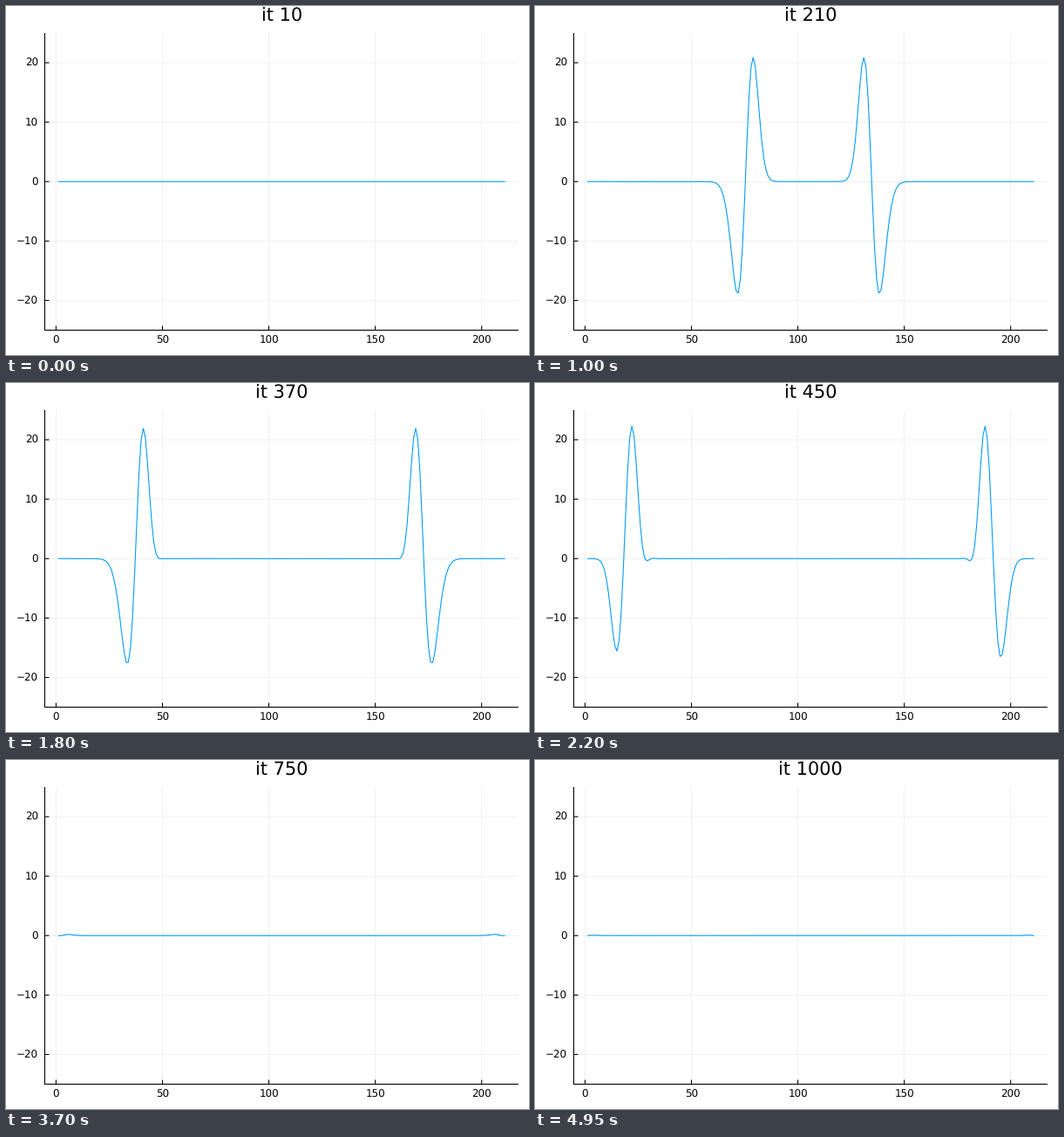
Recreate the animation shown at these times as a matplotlib script. Size 600x400 px, loop 5000 ms.

```python
import numpy as np
import matplotlib.pyplot as plt
from matplotlib.animation import FuncAnimation

plt.rcParams["text.hinting"] = "none"

W, H, DPI = 600, 400, 100
PT = 72 / DPI                     # points per pixel
FRAMES, STEPS = 100, 10           # pictures, time steps per picture

# Wave model: units of one cell and one time step
NX, SRC = 211, 104
COURANT = 0.24
SIGMA, DELAY, GAIN = 15.4, 85.2, 1.01
HALO, REFLECT = 20, 1e-5


def px(x):
    return 57.4 + 2.4415 * x


def py(y):
    return 201.25 - 6.812 * y


# Plot area in pixels
LEFT, RIGHT, TOP, BOTTOM = px(-5.3), px(217.3), py(25), py(-25)


def ricker(t):
    z2 = ((t - DELAY) / SIGMA) ** 2
    return GAIN * (1 - z2) * np.exp(-z2 / 2)


def absorber(pos):
    """Damping coefficients of the absorbing layers at cell positions."""
    depth = np.maximum(HALO - pos, pos - (NX - 1 - HALO)) / HALO
    depth = np.clip(depth, 0, 1)
    d = -3 * COURANT * np.log(REFLECT) / (2 * HALO) * depth ** 2
    alpha = (1 - depth) / (np.sqrt(2) * SIGMA)
    b = np.exp(-(d + alpha))
    return d / (d + alpha) * (b - 1), b


def simulate():
    """Wave equation with a point source, saved every STEPS steps."""
    cells = np.arange(NX)
    a, b = absorber(cells[1:-1])
    a_half, b_half = absorber(cells[:-1] + 0.5)
    old, u = np.zeros(NX), np.zeros(NX)
    psi, xi = np.zeros(NX - 1), np.zeros(NX - 2)
    saved = []
    for t in range(FRAMES * STEPS):
        slope = np.diff(u)
        psi = b_half * psi + a_half * slope
        bend = np.diff(slope + psi)
        xi = b * xi + a * bend
        new = np.zeros(NX)
        new[1:-1] = 2 * u[1:-1] - old[1:-1] + COURANT ** 2 * (bend + xi)
        new[SRC] += ricker(t)
        old, u = u, new
        if (t + 1) % STEPS == 0:
            saved.append(u)
    return saved


fig = plt.figure(figsize=(W / DPI, H / DPI), dpi=DPI, facecolor="white")
ax = fig.add_axes([0, 0, 1, 1])
ax.set(xlim=(0, W), ylim=(H, 0))
ax.axis("off")


def stroke(x, y, color="black", width=1.08, z=3):
    ax.plot(x, y, color=color, lw=width * PT, snap=False,
            solid_capstyle="butt", zorder=z)


def grid(x, y):
    stroke(x, y, "#e6e6e6", 0.55, 1)


def label(x, y, text, size, ha):
    return ax.text(x, y, text, fontsize=size * PT, ha=ha, va="baseline",
                   family="DejaVu Sans", color="black")


for v in range(0, 201, 50):
    x = px(v)
    grid([x, x], [TOP, BOTTOM])
    stroke([x, x], [BOTTOM, BOTTOM - 5])
    label(x, 387.1, str(v), 11.9, "center")
for v in range(-20, 21, 10):
    y = py(v)
    grid([LEFT, RIGHT], [y, y])
    stroke([LEFT, LEFT + 5], [y, y])
    label(36.8, y + 4.2, str(v).replace("-", "\u2212"), 11.9, "right")
stroke([LEFT, LEFT], [TOP, BOTTOM + 0.5])
stroke([LEFT - 0.5, RIGHT], [BOTTOM, BOTTOM])

title = label((LEFT + RIGHT) / 2, 18.2, "", 20.9, "center")
curve, = ax.plot([], [], color="#009afa", lw=1.08 * PT, snap=False, zorder=2,
                 solid_joinstyle="miter", solid_capstyle="butt")
waves = simulate()
xs = px(np.arange(1, NX + 1))


def draw(i):
    curve.set_data(xs, py(waves[i]))
    title.set_text(f"it {(i + 1) * STEPS}")
    return curve, title


anim = FuncAnimation(fig, draw, frames=FRAMES, interval=50, repeat=True,
                     repeat_delay=0)
plt.show()
```
